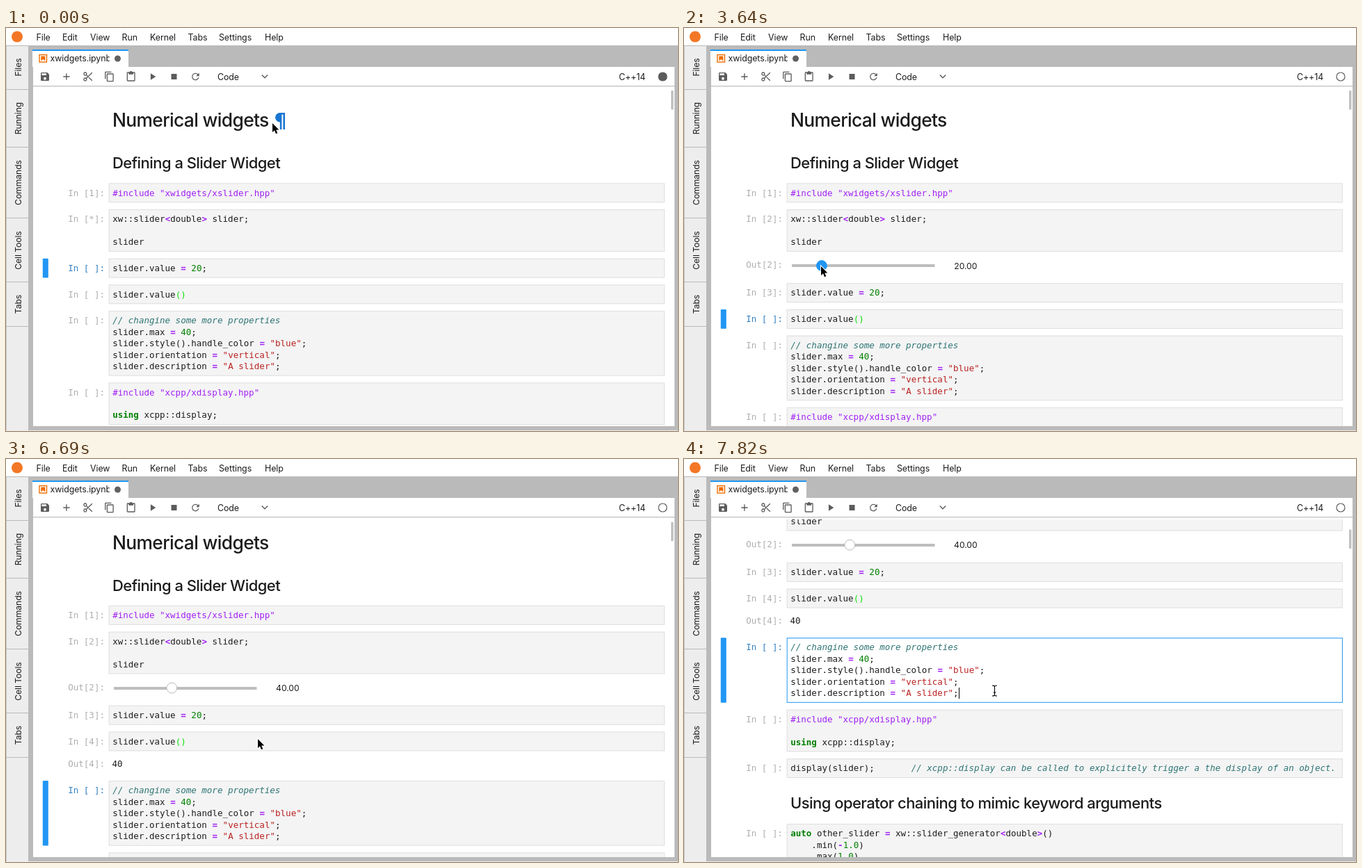
These frames come from a looping animation (966 by 580 pixels, 8 s). An HTML page with a canvas:

```html
<!DOCTYPE html>
<html lang="en">
<head>
<meta charset="utf-8">
<title>Notebook slider widget</title>
<style>
  html, body { margin: 0; width: 100%; height: 100%; overflow: hidden; background: #fff; }
  canvas { display: block; }
</style>
</head>
<body>
<canvas id="stage" width="966" height="580"></canvas>
<script>
const ctx = document.getElementById('stage').getContext('2d');
const LOOP = 8000;
const SANS = 'Inter, "Open Sans", sans-serif';
const MONO = '"DejaVu Sans Mono", "Noto Sans Mono", monospace';
const CODE_SIZE = 12.53, CHAR = 7.543, LINE = 16.42, CODE_X = 153.2, PROMPT_X = 89.2;
const BLUE = '#2196f3', GRAY = '#bababa', ICON = '#5c5c5c', INK = '#1c1c1c';

const SOURCES = [
  '#include "xwidgets/xslider.hpp"',
  'xw::slider<double> slider;\n\nslider',
  'slider.value = 20;',
  'slider.value()',
  '// changine some more properties\nslider.max = 40;\nslider.style().handle_color = "blue";\n' +
    'slider.orientation = "vertical";\nslider.description = "A slider";',
  '#include "xcpp/xdisplay.hpp"\n\nusing xcpp::display;',
  'display(slider);       // xcpp::display can be called to explicitely trigger a the display of an object.',
  'auto other_slider = xw::slider_generator<double>()\n    .min(-1.0)\n    .max(1.0)'
].map(text => text.split('\n'));

const TOKEN = /(\/\/.*)|(#include.*)|("[^"]*")|(\b(?:using|auto)\b)|([=<>]|-(?=\d))|(\b\d+(?:\.\d+)?\b)|((?<=value)\(\))|([^\s=<>"\d\-()]+|.)/g;
const STYLES = [
  ['italic', '#2f7474'], ['', '#a020f5'], ['', '#ba2121'], ['bold', '#008000'],
  ['bold', '#a020f5'], ['', '#008000'], ['', '#0ae00a'], ['', INK]
];

const ICONS = {
  save: 'M17 3H5a2 2 0 0 0-2 2v14a2 2 0 0 0 2 2h14a2 2 0 0 0 2-2V7zM12 19a3 3 0 1 1 0-6 3 3 0 0 1 0 6zM15 9H5V5h10z',
  add: 'M19 13h-6v6h-2v-6H5v-2h6V5h2v6h6z',
  cut: 'M6 3a3 3 0 1 0 .01 0zM6 15a3 3 0 1 0 .01 0zM8 8L21 20.5M8 16L21 3.5',
  copy: 'M16 1H4a2 2 0 0 0-2 2v14h2V3h12zM19 5H8a2 2 0 0 0-2 2v14a2 2 0 0 0 2 2h11a2 2 0 0 0 2-2V7a2 2 0 0 0-2-2zM19 21H8V7h11z',
  paste: 'M19 2h-4.2a3 3 0 0 0-5.6 0H5a2 2 0 0 0-2 2v16a2 2 0 0 0 2 2h14a2 2 0 0 0 2-2V4a2 2 0 0 0-2-2zM19 20H5V4h2v3h10V4h2z',
  run: 'M8 5v14l11-7z',
  stop: 'M6 6h12v12H6z',
  restart: 'M17.65 6.35A8 8 0 1 0 19.73 14h-2.08A6 6 0 1 1 12 6c1.66 0 3.14.69 4.22 1.78L13 11h7V4z'
};
const ICON_PATHS = Object.entries(ICONS).map(([name, d]) => [name, new Path2D(d)]);
const ARROW = new Path2D('M0 0V13L3 10.3 5 15.2 7.3 14.2 5.3 9.5H9.4Z');
const IBEAM = new Path2D('M-3.5-7.5Q0-7.5 0-6Q0-7.5 3.5-7.5M0-6V6M-3.5 7.5Q0 7.5 0 6Q0 7.5 3.5 7.5M-2 2.5H2');
const PILCROW = new Path2D('M395 122h6v24h-2.6V124.4h-2V146h-2.6V135.5a6.7 6.7 0 0 1 0-13.5z');

// Pointer moves: start, end, number of steps, goal x, goal y
const MOVES = [
  [650, 830, 3, 362, 276], [3070, 3640, 10, 197, 343], [3820, 4240, 8, 257, 338],
  [4540, 4900, 7, 269, 430], [6100, 6330, 4, 362, 403], [7280, 7460, 3, 445, 334],
  [7520, 7580, 2, 446, 333]
];
const SCROLL = [[0, 0], [6690, 12.5], [6750, 46], [6840, 88], [6930, 119], [7010, 143],
  [7100, 172], [7190, 195], [7280, 210], [7370, 218.3]];

const since = (list, t) => list.filter(entry => t >= entry[0]).pop()[1];
const smooth = p => p * p * (3 - 2 * p);

function pointerAt(t) {
  let x = 383, y = 137;
  for (const [start, end, steps, goalX, goalY] of MOVES) {
    if (t < start) break;
    const step = Math.floor((t - start) / (end - start) * (steps - 1) + 1e-6) + 1;
    const p = smooth(Math.min(1, step / steps));
    x += (goalX - x) * p;
    y += (goalY - y) * p;
  }
  return { x, y };
}

function sliderValue(t, pointer) {
  if (t < 2390) return 0;
  if (t < 3820) return 20;
  if (t >= 4240) return 40;
  return Math.max(20, Math.min(40, Math.round((pointer.x - 156.6) / 2.02 * 10) / 10));
}

function layout(t) {
  let top = 223.4;
  return SOURCES.map((lines, i) => {
    if (i === 7) top += 56.1;
    const cell = { lines, top, height: 27.9 + LINE * (lines.length - 1) };
    top += cell.height + 9.8;
    if (i === 1 && t >= 1190) top += 35.6;
    if (i === 3 && t >= 6100) top += 32.9;
    return cell;
  });
}

function rect(x, y, w, h, color) {
  ctx.fillStyle = color;
  ctx.fillRect(x, y, w, h);
}

function circle(x, y, r, fill, stroke, width = 1) {
  ctx.beginPath();
  ctx.arc(x, y, r, 0, Math.PI * 2);
  if (fill) { ctx.fillStyle = fill; ctx.fill(); }
  if (stroke) { ctx.strokeStyle = stroke; ctx.lineWidth = width; ctx.stroke(); }
}

function text(str, x, y, font, color = INK, spacing = 0, align = 'left') {
  ctx.font = font;
  ctx.letterSpacing = spacing + 'px';
  ctx.textAlign = align;
  ctx.fillStyle = color;
  ctx.fillText(str, x, y);
}

const label = (str, x, y, align, size = 12.4) =>
  text(str, x, y, `${size}px ${SANS}`, INK, -0.08, align);
const mono = (str, x, y, color, style = '') =>
  text(str, x, y, `${style} ${CODE_SIZE}px ${MONO}`, color);
const heading = (str, y, size) =>
  text(str, 153, y, `500 ${size}px ${SANS}`, INK, -0.0245 * size);

function codeLine(line, y) {
  for (const match of line.matchAll(TOKEN)) {
    const [style, color] = STYLES[match.slice(1).findIndex(group => group !== undefined)];
    mono(match[0], CODE_X + match.index * CHAR, y, color, style);
  }
}

function drawSidebar() {
  rect(0, 26, 33, 553, '#ededed');
  rect(0, 26, 1, 553, '#c8c8c8');
  rect(32, 26, 1, 553, GRAY);
  const tabs = [['Files', 89, 56.5], ['Running', 172, 130], ['Commands', 274, 222.5],
    ['Cell Tools', 366, 320], ['Tabs', 430, 397.5]];
  for (const [name, bottom, middle] of tabs) {
    rect(0, bottom - 1, 33, 1, GRAY);
    ctx.save();
    ctx.translate(21.5, middle);
    ctx.rotate(-Math.PI / 2);
    label(name, 0, 0, 'center', 12.2);
    ctx.restore();
  }
}

function drawToolbar(busy) {
  ICON_PATHS.forEach(([name, path], i) => {
    ctx.save();
    ctx.translate(56 + i * 30.92 - 8, 62);
    ctx.scale(2 / 3, 2 / 3);
    ctx.fillStyle = ctx.strokeStyle = ICON;
    ctx.lineWidth = 2;
    if (name === 'cut') ctx.stroke(path);
    else ctx.fill(path, 'evenodd');
    ctx.restore();
  });
  label('Code', 304, 74.5);
  ctx.strokeStyle = ICON;
  ctx.lineWidth = 1.4;
  ctx.stroke(new Path2D('M367.8 67.5L372 71.8 376.2 67.5'));
  label('C++14', 881, 74.5);
  circle(944, 70, 6, busy ? ICON : '#fff', ICON, 1.2);
}

function drawChrome(busy) {
  rect(0, 0, 966, 580, '#fff');
  circle(16, 12.5, 8, '#f37726');
  const menu = [['File', 43.5], ['Edit', 81], ['View', 121], ['Run', 166.5], ['Kernel', 207],
    ['Tabs', 261.5], ['Settings', 306], ['Help', 372]];
  for (const [name, x] of menu) label(name, x, 17.5);
  rect(0, 25, 966, 554, GRAY);
  rect(0, 579, 966, 1, '#ececec');
  drawSidebar();

  rect(38, 31, 138, 25, '#fff');
  rect(38, 31, 138, 2, BLUE);
  ctx.strokeStyle = '#ef6c00';
  ctx.lineWidth = 1.4;
  ctx.strokeRect(48, 38.5, 10.5, 10.5);
  ctx.fillStyle = '#ef6c00';
  ctx.fill(new Path2D('M50.3 40.5h6v6.8l-3-2.4-3 2.4z'));
  ctx.save();
  ctx.beginPath();
  ctx.rect(60, 34, 88.7, 21);
  ctx.clip();
  label('xwidgets.ipynb', 63.5, 48.3);
  ctx.restore();
  circle(160.5, 44, 4.5, '#616161');

  rect(39, 56, 922, 517, '#fff');
  drawToolbar(busy);
  rect(39, 83, 922, 1, '#c2c2c2');
  rect(39, 84, 922, 1, '#ececec');
}

function drawBar(top, height) {
  ctx.fillStyle = BLUE;
  ctx.beginPath();
  ctx.roundRect(52.8, top, 8, height, 1.2);
  ctx.fill();
}

function drawCell(cell, count, active, editing) {
  const { lines, top, height } = cell;
  if (active) drawBar(top, height);
  mono(`In [${count}]:`, PROMPT_X, top + 18.2, active ? '#307fc1' : '#aeaeae');
  rect(147.7, top, 799.2, height, editing ? '#fff' : '#f4f4f4');
  ctx.strokeStyle = editing ? BLUE : '#dfdfdf';
  ctx.lineWidth = 1;
  ctx.strokeRect(148.2, top + 0.5, 798.2, height - 1);
  lines.forEach((line, i) => codeLine(line, top + 18.2 + i * LINE));
}

function drawCaret(cell) {
  const last = cell.lines.length - 1;
  const x = Math.floor(CODE_X + cell.lines[last].length * CHAR + 0.7);
  rect(x, Math.round(cell.top + 6 + last * LINE), 1, 16, '#000');
}

function drawSlider(top, value, pointer, active) {
  if (active) drawBar(top + 70.6, 26);
  const x = 157.5 + value * 2.02, y = top + 80.9;
  mono('Out[2]:', PROMPT_X, top + 84, '#aeaeae');
  rect(155, Math.round(y) - 2, 205.5, 4, '#bdbdbd');
  const hot = Math.hypot(pointer.x - x, pointer.y - y) < 9;
  circle(x, y, 7.4, hot ? BLUE : '#fff', hot ? BLUE : '#b8b8b8');
  label(value.toFixed(2), 404.8, top + 85.4, 'center', 12.2);
}

function drawPointer(pointer, overCode) {
  ctx.save();
  if (overCode) {
    ctx.translate(Math.round(pointer.x) + 0.5, Math.round(pointer.y) + 0.5);
    ctx.strokeStyle = '#000';
    ctx.lineWidth = 1.1;
    ctx.stroke(IBEAM);
  } else {
    ctx.translate(pointer.x, pointer.y);
    ctx.strokeStyle = '#fff';
    ctx.lineWidth = 2;
    ctx.stroke(ARROW);
    ctx.fillStyle = '#000';
    ctx.fill(ARROW);
  }
  ctx.restore();
}

function draw(t) {
  const pointer = pointerAt(t);
  const scroll = since(SCROLL, t);
  const cells = layout(t);
  const active = since([[0, 2], [2300, 3], [3820, 1], [5200, 3], [5920, 4]], t);
  const editing = (t >= 5200 && t < 5920) || t >= 7820;
  const caret = editing && (t < 5650 || t >= 7820);
  const busy = t < 1190 || (t >= 2300 && t < 2390) || (t >= 5920 && t < 6100);
  const counts = [
    1,
    t < 1190 ? '*' : 2,
    since([[0, ' '], [2300, '*'], [2390, 3]], t),
    since([[0, ' '], [5920, '*'], [6100, 4]], t)
  ];

  drawChrome(busy);
  ctx.save();
  ctx.beginPath();
  ctx.rect(39, 87, 922, 486);
  ctx.clip();
  heading('Numerical widgets', 142 - scroll, 26.4);
  if (t < 650) {
    ctx.fillStyle = '#1976d2';
    ctx.fill(PILCROW);
  }
  heading('Defining a Slider Widget', 202 - scroll, 22);
  cells.forEach((cell, i) => {
    const shown = { ...cell, top: cell.top - scroll };
    drawCell(shown, counts[i] ?? ' ', i === active, editing && i === active);
    if (caret && i === active) drawCaret(shown);
    if (i === 1 && t >= 1190) drawSlider(shown.top, sliderValue(t, pointer), pointer, active === 1);
    if (i === 3 && t >= 6100) {
      mono('Out[4]:', PROMPT_X, shown.top + 50.6, '#aeaeae');
      mono('40', 152.4, shown.top + 50.4, INK);
    }
    if (i === 6) heading('Using operator chaining to mimic keyword arguments', shown.top + 72.2, 22);
  });
  ctx.restore();

  ctx.fillStyle = '#c1c1c1';
  ctx.beginPath();
  ctx.roundRect(956, 90 + scroll * 0.053, 3.5, 27.5, 1);
  ctx.fill();

  // The pointer shape only refreshes when the pointer itself moves
  const hitY = pointer.y + (t < 7280 ? 0 : scroll);
  drawPointer(pointer, cells.some(c => hitY > c.top && hitY < c.top + c.height));
}

let begin;
function tick(now) {
  begin ??= now;
  draw((now - begin) % LOOP);
  requestAnimationFrame(tick);
}
draw(0);
requestAnimationFrame(tick);
</script>
</body>
</html>
```
